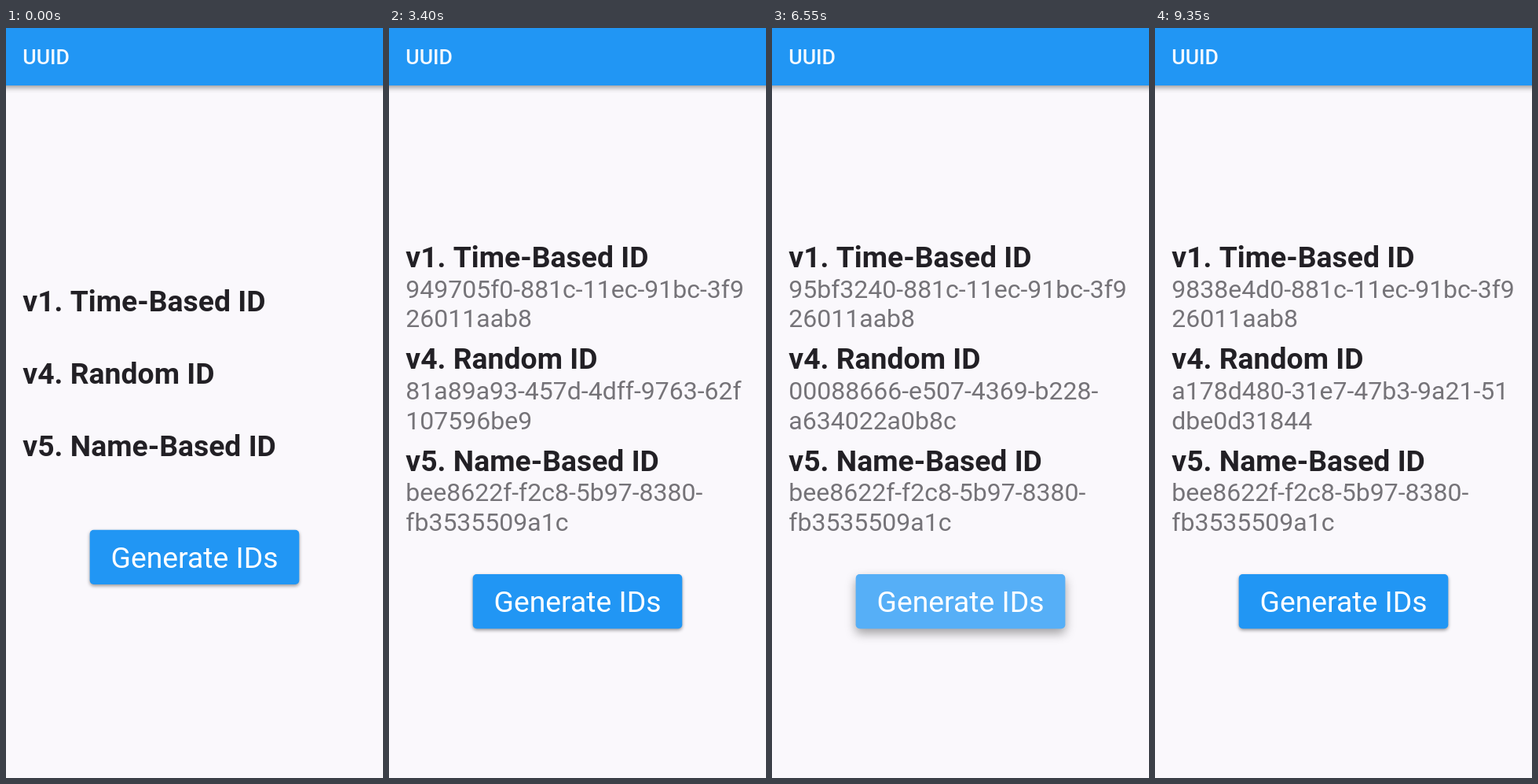
Recreate the animation shown at these times as an HTML page with a canvas. Size 480 by 953 pixels, loop 9.4 s.

```html
<!DOCTYPE html>
<html lang="en">
<head>
<meta charset="utf-8">
<title>UUID</title>
<style>
  html, body { margin: 0; width: 100%; height: 100%; overflow: hidden; background: #faf8fc; }
  canvas { display: block; width: 480px; height: 953px; }
</style>
</head>
<body>
<canvas id="stage" width="480" height="953"></canvas>
<script>
const ctx = document.getElementById('stage').getContext('2d');
const W = 480, H = 953, LOOP = 9400, STEP = 50;
const BLUE = '#2196f4', PAPER = '#faf8fc', INK = '#222025', GREY = '#757378';
const FONT = 'Roboto, sans-serif';
const LEFT = 21.3;

const HEADINGS = ['v1. Time-Based ID', 'v4. Random ID', 'v5. Name-Based ID'];
const V1_TAIL = '-881c-11ec-91bc-3f9';
const V1_LINE2 = '26011aab8';
const V5 = ['bee8622f-f2c8-5b97-8380-', 'fb3535509a1c'];

// Each tap: finger down, finger up, touch point, and the IDs it generates.
const TAPS = [
  { down: 340, up: 1166, x: 262, v1: '93917cd0', v4: ['a95944f6-023b-4757-', 'a9d5-46f1b962e9d4'] },
  { down: 1890, up: 2880, x: 262, v1: '949705f0', v4: ['81a89a93-457d-4dff-9763-62f', '107596be9'] },
  { down: 3690, up: 4821, x: 266, v1: '95bf3240', v4: ['00088666-e507-4369-b228-', 'a634022a0b8c'] },
  { down: 5690, up: 7171, x: 270, v1: '9725c720', v4: ['365f91e2-dcad-4482-a1b3-', 'd67ccbbf9ea0'] },
  { down: 7890, up: 8974, x: 274, v1: '9838e4d0', v4: ['a178d480-31e7-47b3-9a21-51', 'dbe0d31844'] }
];

const clamp = v => Math.min(1, Math.max(0, v));
const mix = (a, b, k) => a + (b - a) * k;

function bezier(x1, y1, x2, y2) {
  const at = (a, b, s) => 3 * a * s * (1 - s) ** 2 + 3 * b * s * s * (1 - s) + s ** 3;
  return x => {
    let lo = 0, hi = 1;
    for (let i = 0; i < 24; i++) {
      const mid = (lo + hi) / 2;
      if (at(x1, x2, mid) < x) lo = mid; else hi = mid;
    }
    return at(y1, y2, (lo + hi) / 2);
  };
}
const ease = bezier(0.25, 0.1, 0.25, 1);
const fastOutSlowIn = bezier(0.4, 0, 0.2, 1);

function text(str, x, y, size, color, weight = 400, align = 'left') {
  ctx.font = `${weight} ${size}px ${FONT}`;
  ctx.fillStyle = color;
  ctx.textAlign = align;
  ctx.fillText(str, x, y);
}

function withShadow(alpha, blur, dy, draw) {
  ctx.save();
  ctx.shadowColor = `rgba(0, 0, 0, ${alpha})`;
  ctx.shadowBlur = blur;
  ctx.shadowOffsetY = dy;
  draw();
  ctx.restore();
}

function drawAppBar() {
  ctx.fillStyle = BLUE;
  withShadow(0.42, 7, 2.5, () => ctx.fillRect(-20, -20, W + 40, 93));
  text('UUID', LEFT, 46, 26.67, '#f4f9fe', 500);
}

function drawList(ids) {
  const top = ids ? 303.8 : 360;
  const pitch = ids ? 129.4 : 91.9;
  HEADINGS.forEach((heading, i) => {
    const y = top + i * pitch;
    text(heading, LEFT, y, 37.33, INK, 700);
    if (ids) ids[i].forEach((line, k) => text(line, LEFT, y + 38.8 + k * 37.5, 32, GREY));
  });
}

function drawRipple(tap, t, top) {
  const grow = ease(clamp((t - tap.down) / 1000));
  const fadeIn = clamp((t - tap.down) / 75);
  const fadeOut = 1 - clamp((t - tap.up - 225) / 150);
  ctx.fillStyle = `rgba(255, 255, 255, ${0.24 * fadeIn * fadeOut})`;
  ctx.beginPath();
  ctx.arc(mix(tap.x, 240, grow), top + mix(28, 34.5, grow), mix(41.4, 143, grow), 0, Math.PI * 2);
  ctx.fill();
}

function drawButton(t, tap, top) {
  let lift = 0;
  if (tap) {
    lift = t < tap.up
      ? fastOutSlowIn(clamp((t - tap.down) / 200))
      : 1 - fastOutSlowIn(clamp((t - tap.up) / 200));
  }
  const shape = new Path2D();
  shape.roundRect(106.7, top, 266.6, 69.2, 5);
  ctx.fillStyle = BLUE;
  withShadow(mix(0.4, 0.36, lift), mix(4, 13, lift), mix(2, 6, lift), () => ctx.fill(shape));
  if (tap) {
    ctx.save();
    ctx.clip(shape);
    drawRipple(tap, t, top);
    ctx.restore();
  }
  text('Generate IDs', 240, top + 47.8, 37.33, '#fff', 400, 'center');
}

function draw(t) {
  const tap = TAPS.findLast(p => t >= p.down);
  const done = TAPS.findLast(p => t >= p.up);
  const ids = done && [[done.v1 + V1_TAIL, V1_LINE2], done.v4, V5];
  ctx.fillStyle = PAPER;
  ctx.fillRect(0, 0, W, H);
  drawAppBar();
  drawList(ids);
  drawButton(t, tap, ids ? 694 : 637.8);
}

const start = performance.now();
function tick() {
  const t = (performance.now() - start) % LOOP;
  draw(Math.floor(t / STEP) * STEP);
  requestAnimationFrame(tick);
}
tick();
</script>
</body>
</html>
```
